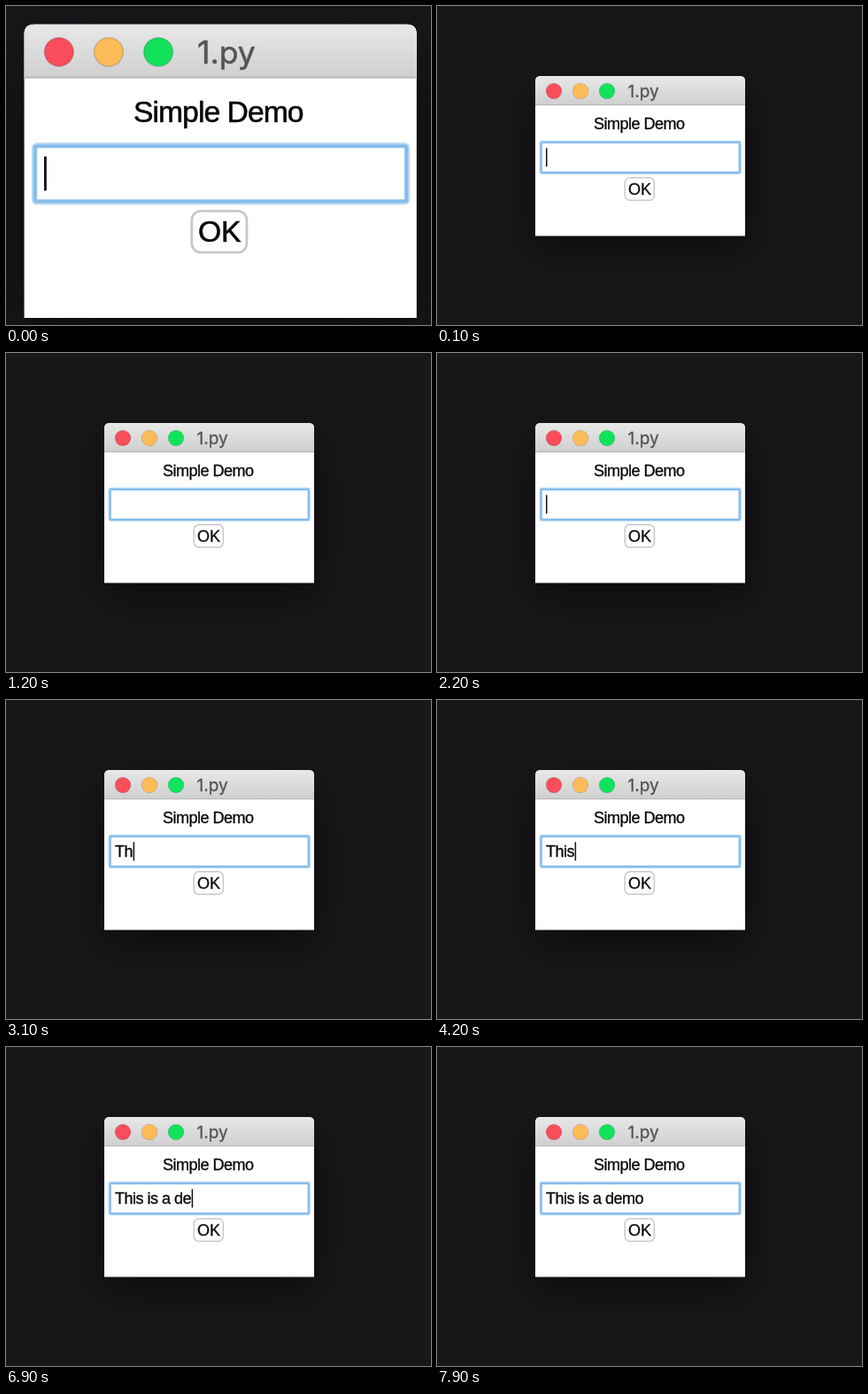
These frames come from a looping animation (480x360 px, 8 s). An HTML page:

```html
<!DOCTYPE html>
<html lang="en">
<head>
<meta charset="utf-8">
<title>Simple Demo</title>
<style>
  html, body { margin: 0; width: 100%; height: 100%; overflow: hidden; background: #19171a; }
  svg { display: block; width: 100vw; height: 100vh; }
  text { font: 18px "Liberation Sans", Arial, sans-serif; fill: #080808; stroke: #080808; stroke-width: .3; white-space: pre; }
  .tight { letter-spacing: -.5px; }
  #title { font: 19px Inter, sans-serif; fill: #555356; stroke: #555356; }
  #shadow { filter: blur(24px); }
  circle { stroke: #0002; stroke-width: 1; }
</style>
</head>
<body>
<svg viewBox="0 0 480 360">
  <defs>
    <linearGradient id="bar" x2="0" y2="1">
      <stop stop-color="#e9e8e9"/>
      <stop offset="1" stop-color="#d0cfd0"/>
    </linearGradient>
  </defs>
  <rect width="480" height="360" fill="#19171a"/>
  <g id="scene">
    <rect id="shadow" x="106" y="96" width="247" height="182" fill="#0d0b0e"/>
    <path d="M111 259.5V85q0-6 6-6H342q6 0 6 6V259.5z" fill="#fff"/>
    <path d="M111 112V85q0-6 6-6H342q6 0 6 6V112z" fill="url(#bar)"/>
    <path d="M111 111.7H348" stroke="#b3b2b3"/>
    <circle cx="132" cy="96" r="8.8" fill="#f94d5c"/>
    <circle cx="162" cy="96" r="8.8" fill="#fbbc58"/>
    <circle cx="192" cy="96" r="8.8" fill="#10e25c"/>
    <text id="title" x="215.5" y="103">1.py</text>
    <text class="tight" x="177" y="139">Simple Demo</text>
    <rect x="117.2" y="153.5" width="225" height="34.8" rx="1.5" fill="#fff" stroke="#b5d8f5" stroke-width="3.4"/>
    <rect x="117.6" y="153.9" width="224.2" height="34" rx="1" fill="none" stroke="#86bdea" stroke-width="2"/>
    <text class="tight" id="entry" x="123" y="176.5"></text>
    <rect id="caret" y="160.3" width="1.5" height="21" fill="#111"/>
    <rect x="212.2" y="193.8" width="33.2" height="25.5" rx="5.5" fill="#fff" stroke="#cbc7cc" stroke-width="1.5"/>
    <text x="216" y="212.7">OK</text>
  </g>
</svg>
<script>
  const LOOP = 8000, ZOOM_END = 100;
  const BLINK = 1350, CARET_ON = 900;
  const PHRASE = "This is a demo";
  // Moment at which each character of PHRASE appears, in ms.
  const KEY_TIMES = [2900, 3100, 3700, 4100, 4600, 4900, 5000, 5100, 5200, 6400, 6700, 6900, 7200, 7500];

  const [scene, entry, caret] = ["scene", "entry", "caret"].map(id => document.getElementById(id));

  function draw(now) {
    const t = now % LOOP;
    scene.setAttribute("transform", t < ZOOM_END ? "matrix(1.87 0 0 1.835 -187 -124.3)" : "");

    const typed = KEY_TIMES.filter(key => key <= t).length;
    entry.textContent = PHRASE.slice(0, typed);
    const width = typed ? entry.getComputedTextLength() : 0;
    caret.setAttribute("x", 123 + width + (typed ? .6 : 0));
    caret.setAttribute("visibility", t % BLINK < CARET_ON ? "visible" : "hidden");
  }

  function tick() {
    draw(performance.now());
    requestAnimationFrame(tick);
  }
  tick();
</script>
</body>
</html>
```
